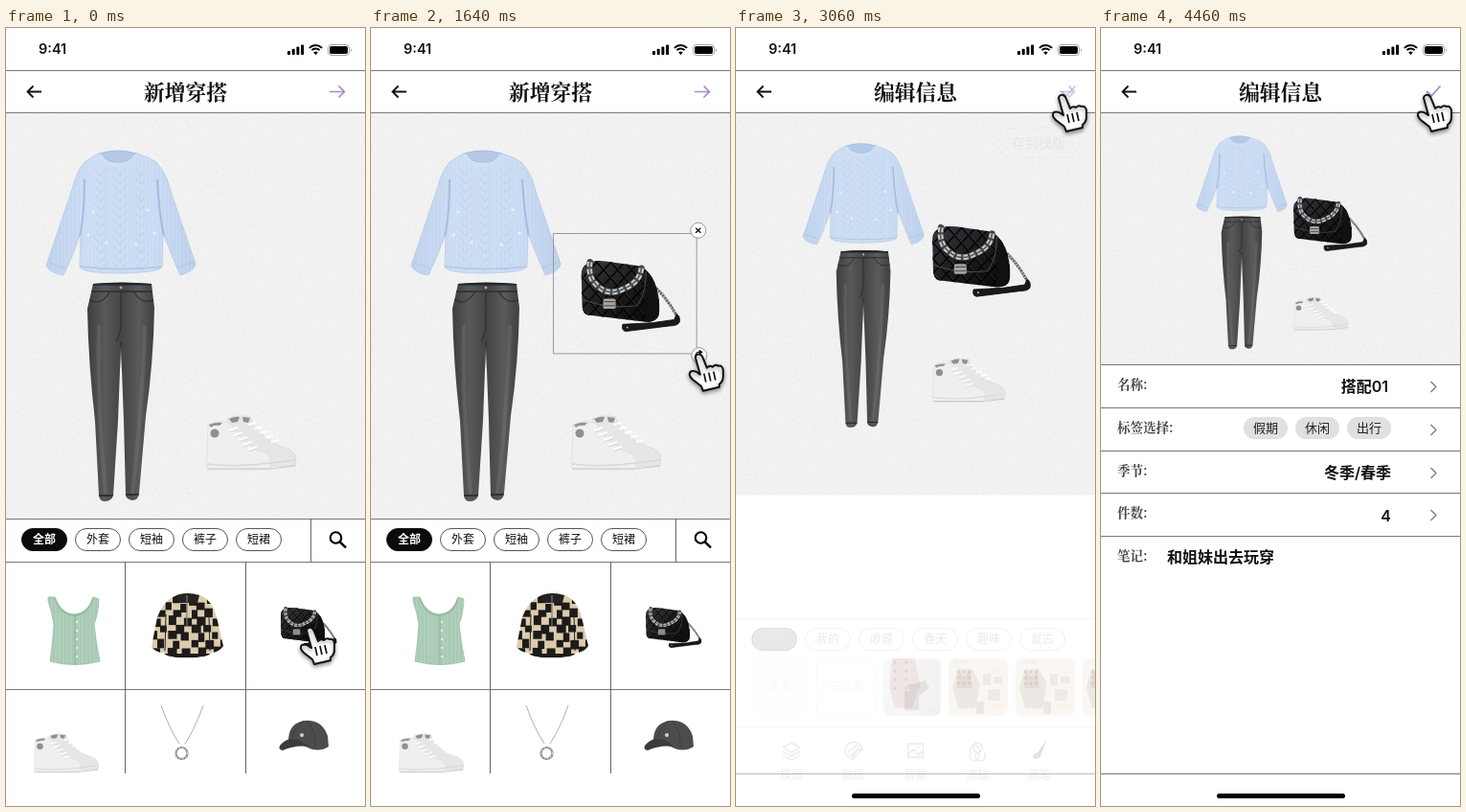
Write an HTML page with a canvas that moves like this. It is 375 by 812 pixels and loops after 4.98 s.

```html
<!DOCTYPE html>
<html lang="zh-CN">
<head>
<meta charset="utf-8">
<style>
html, body { margin: 0; width: 100%; height: 100%; overflow: hidden; background: #fff; }
canvas { display: block; width: 375px; height: 812px; }
</style>
</head>
<body>
<canvas id="stage"></canvas>
<script>
const LOOP = 4980, W = 375, H = 812;
const SANS = '"Inter", "Noto Sans CJK SC", "Noto Sans CJK", sans-serif';
const SERIF = '"Noto Serif CJK SC", "Noto Sans CJK SC", "Noto Sans CJK", serif';
const INK = '#111', RULE = '#777', PURPLE = '#a98acb';
const canvas = document.getElementById('stage');
const ratio = window.devicePixelRatio || 1;
canvas.width = W * ratio;
canvas.height = H * ratio;
const c = canvas.getContext('2d');

// ---- helpers ----
const clamp = x => Math.max(0, Math.min(1, x));
const span = (t, a, b) => clamp((t - a) / (b - a));
const ease = x => (1 - Math.cos(Math.PI * x)) / 2;
const mix = (a, b, p) => a + (b - a) * p;
const mixPoint = (a, b, p) => [mix(a[0], b[0], p), mix(a[1], b[1], p)];

function random(seed) {
  return () => (seed = (seed * 16807) % 2147483647) / 2147483647;
}

function group(draw, { alpha = 1, x = 0, y = 0, scale = 1 } = {}) {
  if (alpha <= 0) return;
  c.save();
  c.globalAlpha *= alpha;
  c.translate(x, y);
  c.scale(scale, scale);
  draw();
  c.restore();
}

function shape(d, fill, stroke, width = 1) {
  const path = new Path2D(d);
  if (fill) { c.fillStyle = fill; c.fill(path); }
  if (stroke) { c.strokeStyle = stroke; c.lineWidth = width; c.stroke(path); }
}

function clipped(d, draw) {
  c.save();
  c.clip(new Path2D(d));
  draw();
  c.restore();
}

function box(x, y, w, h, r, fill, stroke, dash = []) {
  c.beginPath();
  c.roundRect(x, y, w, h, r);
  if (fill) { c.fillStyle = fill; c.fill(); }
  if (stroke) {
    c.setLineDash(dash);
    c.strokeStyle = stroke;
    c.lineWidth = 1;
    c.stroke();
    c.setLineDash([]);
  }
}

function dot(x, y, r, fill, stroke, width = 1) {
  c.beginPath();
  c.arc(x, y, r, 0, 7);
  if (fill) { c.fillStyle = fill; c.fill(); }
  if (stroke) { c.strokeStyle = stroke; c.lineWidth = width; c.stroke(); }
}

const rule = (y, color = RULE) => shape(`M0 ${y + .5}H375`, null, color);

function text(s, x, y, size, { weight = 500, color = INK, align = 'center', family = SANS } = {}) {
  c.font = `${weight} ${size}px ${family}`;
  c.fillStyle = color;
  c.textAlign = align;
  c.textBaseline = 'alphabetic';
  c.fillText(s, x, y + size * .37);
}

function paperPattern() {
  const tile = document.createElement('canvas');
  tile.width = tile.height = 128;
  const p = tile.getContext('2d'), next = random(41);
  for (let i = 0; i < 128 * 128; i++) {
    const v = 238 + Math.floor(next() * 7);
    p.fillStyle = `rgb(${v},${v},${v})`;
    p.fillRect(i % 128, i >> 7, 1, 1);
  }
  return c.createPattern(tile, 'repeat');
}
const paper = paperPattern();

// ---- clothes ----
function sweater() {
  const outline = 'M97 131Q117 126 137 131Q150 135 157 140Q168 152 172 170L198 246Q197 254 182 258Q174 240 164 214L163 249Q161 255 120 256Q79 256 77 249L78 214Q70 238 60 258Q46 256 42 248L69 168Q74 149 82 140Q89 135 97 131Z';
  const tone = c.createLinearGradient(42, 0, 198, 0);
  tone.addColorStop(0, '#bdd1ec');
  tone.addColorStop(.3, '#cbdcf3');
  tone.addColorStop(.7, '#c9dbf3');
  tone.addColorStop(1, '#bacfeb');
  shape(outline, tone, '#b4c9e6', .8);
  clipped(outline, () => {
    for (let x = 50; x < 198; x += 4) shape(`M${x} 128V258`, null, 'rgba(255,255,255,.15)', 1.2);
    for (let y = 146; y < 250; y += 9) {
      for (const x of [99, 119, 141]) shape(`M${x - 7} ${y}l7 8l7 -8`, null, 'rgba(151,178,217,.3)');
    }
    shape('M82 158Q82 195 77 218M158 158Q160 195 165 218', null, 'rgba(126,158,205,.5)', 2);
    shape('M77 249Q119 254 164 249M43 244l19 7M178 250l20 -6', null, '#b2c8e5', 1.3);
    for (const [x, y] of [[91, 192], [148, 190], [86, 216], [155, 214], [105, 224], [136, 226]]) dot(x, y, 1.6, '#e9f1fc');
  });
  shape('M98 131Q117 125 136 131Q131 140 117 140Q103 140 98 131Z', '#b3c9e7', '#a5bedf', 1);
  shape('M98 132Q104 143 117 143Q130 143 136 132', null, '#d0e0f5', 3);
}

function jeans() {
  const outline = 'M91 267Q120 264 152 267L155 292Q154 350 146 405L139 486Q138 493 132 493Q126 492 125 488L123 410L120 331L117 410L112 488Q110 494 103 494Q98 494 97 488L93 410Q86 350 85 293Z';
  const tone = c.createLinearGradient(85, 0, 157, 0);
  ['#3d3e40', '#58595b', '#434446', '#5a5b5d', '#3a3b3d'].forEach((v, i) => tone.addColorStop(i / 4, v));
  shape(outline, tone);
  clipped(outline, () => {
    shape('M90 267H153', null, '#242527', 3);
    shape('M87 275H156', null, '#2c2d2f', 1.3);
    shape('M86 283Q99 291 108 276M134 276Q142 290 156 283M120 276V310Q119 322 115 327M120 327V410', null, '#2c2d2f', 1.2);
    shape('M97 310Q95 390 104 486M145 310Q143 390 132 486', null, 'rgba(135,136,138,.25)', 4);
    shape('M95 488H114M123 487H142', null, '#252628', 1.3);
  });
  dot(120, 271, 1.4, '#b0a8a0');
}

function sneakers() {
  shape('M231 408Q243 403 256 406L258 414Q272 431 288 437Q303 440 303 451L302 457L235 458Z', '#e6e6e5', '#d8d8d7', .8);
  shape('M233 408Q240 405 244 406L242 411L236 412ZM247 406L255 407L253 412L248 411Z', '#8d8f90');
  shape('M211 414Q223 408 235 413L240 420Q249 434 264 441Q279 444 277 457L275 461H211Q208 459 210 445Z', '#efefee', '#dededd', .8);
  shape('M212 414Q219 411 226 412L223 415Q217 414 214 417Z', '#929394');
  shape('M210 455Q240 459 276 454L302 451', null, '#d8d8d7', 1.4);
  shape('M210 460H276L302 457', null, '#c8c8c7', 1.2);
  for (let i = 0; i < 5; i++) {
    shape(`M${233 + i * 5} ${420 + i * 5}l9 -3M${253 + i * 6} ${414 + i * 4.5}l8 -2`, null, '#fff', 2);
    shape(`M${233 + i * 5} ${422 + i * 5}l9 -3`, null, '#d4d4d4', .8);
  }
  dot(218, 423, 4.5, '#8d8f90');
}

function chain(d, width) {
  c.lineCap = 'round';
  shape(d, null, '#45464a', width);
  c.lineCap = 'butt';
  c.setLineDash([width * .75, width * .4]);
  shape(d, null, '#c9cacc', width * .85);
  shape(d, null, '#55565a', width * .25);
  c.setLineDash([]);
}

function bag(x, y, scale) {
  group(() => {
    c.translate(-272, -280);
    chain('M301 266Q316 278 331 304', 3.4);
    shape('M331 303Q336 305 335 313Q333 318 322 318L266 325Q260 324 262 316L300 314L328 310Z', '#1a1a1c', '#070707', 1);
    dot(268, 320, 1.3, '#aaa');
    const body = 'M214 240Q222 233 240 235L282 241Q295 245 303 262Q310 280 309 300Q308 313 292 313L217 304Q211 303 210 292L209 252Q209 243 214 240Z';
    const tone = c.createLinearGradient(225, 235, 285, 315);
    tone.addColorStop(0, '#333338');
    tone.addColorStop(.5, '#1c1c1f');
    tone.addColorStop(1, '#0b0b0c');
    shape(body, tone);
    clipped(body, () => {
      for (let i = -80; i < 110; i += 18) {
        shape(`M${215 + i} 232l75 85`, null, '#050506', 2);
        shape(`M${217 + i} 232l75 85`, null, '#3e3e43', .8);
        shape(`M${295 + i} 232l-75 80`, null, '#050506', 2);
      }
      shape('M210 284Q245 297 280 292Q292 278 292 247', null, '#48484c', 1.3);
      shape('M293 250Q310 278 308 312L290 313Q297 285 293 250Z', '#111113');
    });
    chain('M220 236Q217 256 229 266Q244 281 264 270Q284 262 286 244', 8);
    box(237, 283, 16, 13, 2, '#aaa49d');
    shape('M238 287H252M238 292H252', null, '#58534f', 1.5);
  }, { x, y, scale });
}

function vest() {
  const outline = 'M44 594L51 594Q57 611 71 612Q86 611 91 594L97 596Q96 613 92 622Q94 642 98 661Q72 668 46 661Q49 640 50 622Q48 610 44 598Z';
  shape(outline, '#a8cab5', '#98bba6', .8);
  clipped(outline, () => {
    for (let x = 44; x < 102; x += 4) shape(`M${x} 594V668`, null, 'rgba(219,238,224,.25)', 1.2);
    shape('M72 612V667', null, '#8db39c', 1.2);
  });
  shape('M51 595Q57 613 72 613Q86 612 91 595', null, '#93b8a2', 1.4);
  for (let y = 620; y < 664; y += 9) dot(74, y, 1.2, '#e6efe6');
}

function jacket() {
  const outline = 'M178 592Q189 588 203 592Q216 598 220 615L227 645Q222 652 214 652Q212 657 189 657Q166 657 165 652Q157 652 152 646L158 615Q164 598 178 592Z';
  shape(outline, '#dccbad');
  clipped(outline, () => {
    const next = random(77);
    c.fillStyle = '#1d1b19';
    for (let row = 0; row < 9; row++) {
      for (let col = 0; col < 10; col++) {
        if ((row + col) % 2) c.fillRect(150 + col * 8 + next() * 4, 589 + row * 8 + next() * 4, 6 + next() * 4, 7 + next() * 3);
      }
    }
    c.fillRect(164, 653, 52, 6);
    shape('M167 612L166 650M212 612L213 650', null, '#222', 1);
  });
  shape('M178 592Q189 588 202 592L200 600H180Z', '#242321');
  shape('M189 592V625', null, '#6c7c88', 1.2);
}

function necklace() {
  shape('M162 707Q170 730 181 747M206 707Q198 730 187 747', null, '#a6a6a6', .9);
  dot(183.5, 757, 6, null, '#8d8d8d', 2.2);
  c.setLineDash([1.5, 2]);
  dot(183.5, 757, 6, null, '#e4e4e4', 1);
  c.setLineDash([]);
}

function cap() {
  shape('M295 744Q295 726 311 723Q330 721 336 739L337 750Q326 757 313 750Q304 745 295 746Z', '#4b4c4d');
  shape('M296 742Q308 741 316 750Q302 748 289 754Q284 753 286 749Q290 744 296 742Z', '#3a3b3c');
  shape('M314 723Q324 732 323 751M311 723Q301 730 299 741', null, '#3e3f40', 1);
  dot(309, 738, 2, '#d4d4d4');
}

// ---- interface ----
function pill(label, x, y, active) {
  box(x + .5, y + .5, 47, 23, 11.5, active ? '#0b0b0b' : '#fff', active ? '#0b0b0b' : '#555');
  text(label, x + 24, y + 12, 12, { weight: active ? 700 : 500, color: active ? '#fff' : INK });
}

const pills = (labels, y) => labels.forEach((s, i) => pill(s, 16 + i * 56, y, i === 0));

function statusBar() {
  text('9:41', 34, 22, 14.5, { weight: 600, align: 'left' });
  for (let i = 0; i < 4; i++) box(294 + i * 4.7, 24 - i * 2.2, 3, 4 + i * 2.2, .8, '#000');
  for (const r of [9, 5.6]) {
    c.beginPath();
    c.arc(323.5, 27, r, -Math.PI * .76, -Math.PI * .24);
    c.strokeStyle = '#000';
    c.lineWidth = 2;
    c.stroke();
  }
  shape('M323.5 28l-2.3 -2.6q2.3 -1.8 4.6 0Z', '#000');
  box(336.5, 17.5, 22, 11, 3.5, null, '#a5a5a5');
  box(338, 19, 19, 8, 2, '#000');
  shape('M360 21.5q2 1.5 0 3.5Z', '#999');
}

function header(editing, checked) {
  c.fillStyle = '#fff';
  c.fillRect(0, 0, W, 88);
  statusBar();
  rule(44);
  rule(88);
  shape('M37 66.5H22.5M28.5 60.5L22.5 66.5L28.5 72.5', null, INK, 1.8);
  const style = { weight: 900, family: SERIF };
  group(() => text('新增穿搭', 187.5, 66.5, 21.8, style), { alpha: 1 - editing });
  group(() => text('编辑信息', 187.5, 66.5, 21.8, style), { alpha: editing });
  group(() => shape('M338 66.5H353.5M347.5 60.5L353.5 66.5L347.5 72.5', null, PURPLE, 1.7), { alpha: 1 - checked });
  group(() => shape('M340 66L345 71L354.5 60.5', null, PURPLE, 1.8), { alpha: checked });
}

function wardrobe() {
  c.fillStyle = '#fff';
  c.fillRect(0, 512, W, 300);
  rule(512);
  rule(557);
  rule(690);
  shape('M318.5 512V557M124.5 557V778M250.5 557V778', null, '#666');
  pills(['全部', '外套', '短袖', '裤子', '短裙'], 522);
  dot(344.5, 532, 5.8, null, '#000', 2.1);
  shape('M348.8 536.3L355 542.3', null, '#000', 2.5);
  vest();
  jacket();
  bag(316, 626, .46);
  clipped('M0 690H375V778H0Z', () => group(() => {
    c.translate(-209, -404);
    sneakers();
  }, { x: 29, y: 736, scale: .72 }));
  necklace();
  cap();
}

function boots(x) {
  box(x, 658, 60, 60, 7, '#a7a39d');
  c.save();
  c.clip();
  shape(`M${x + 36} 658h24v60h-24Z`, '#c5c0b8');
  shape(`M${x + 9} 658h24l5 28l-8 24h-18l-6 -22Z`, '#873f2e');
  for (let i = 0; i < 15; i++) dot(x + 12 + i % 4 * 6, 662 + Math.floor(i / 4) * 9, 1.7, i % 2 ? '#e0c5a6' : '#252222');
  shape(`M${x + 25} 686l19 -5l4 8l-16 12ZM${x + 22} 692h15v20h-15Z`, '#252729');
  dot(x + 7, 712, 5, '#ded8c8');
  dot(x + 53, 712, 5, '#d4c7a8');
  c.restore();
}

function collage(x) {
  box(x, 658, 62, 60, 7, '#c59c70');
  c.save();
  c.clip();
  text('今日穿搭', x + 5, 663, 4, { align: 'left', color: '#50402f' });
  shape(`M${x + 10} 669h14l9 15l-5 26h-18l-6 -22Z`, '#4e4b4a');
  shape(`M${x + 11} 669l5 12l6 -12l3 20h-16Z`, '#9f4d2b');
  for (let i = 0; i < 9; i++) dot(x + 10 + i % 3 * 6, 672 + Math.floor(i / 3) * 6, 1.5, '#242120');
  shape(`M${x + 36} 674h8v12h-8ZM${x + 47} 677h9v7h-9ZM${x + 41} 690h13v12h-13Z`, '#686b69');
  dot(x + 50, 671, 5, '#ddd5c7');
  box(x + 29, 703, 8, 13, 1, '#4b382d');
  box(x + 43, 705, 15, 6, 2, '#ddcbb0');
  c.restore();
}

const TABS = [
  ['模版', 'M0 -8L9 -3L0 2L-9 -3ZM-9 1L0 6L9 1M-9 5L0 10L9 5'],
  ['贴纸', 'M9 -1A9 9 0 1 0 -1 9L9 -1Q1 -2 -1 9M-6 2L4 -6M-3 6L6 -3'],
  ['背景', 'M-8 -7H8V7H-8ZM-8 4L-2 -1L3 5L5 2L8 4M3 -3h1'],
  ['滤镜', 'M-5 -3A5 5 0 1 1 5 -3A5 5 0 1 1 -5 -3M-7 3A5 5 0 1 0 1 3A5 5 0 1 0 -7 3M-1 3A5 5 0 1 0 7 3'],
  ['画笔', 'M6 -8L-1 2L1 4ZM-2 3Q-6 4 -6 8Q0 8 1 5Z']
];

function templates() {
  c.fillStyle = '#fff';
  c.fillRect(0, 616, W, 196);
  rule(616);
  rule(729);
  pills(['精选', '我的', '收藏', '春天', '趣味', '复古'], 626);
  box(16, 658, 60, 60, 7, '#eee');
  text('更多', 46, 688, 12, { color: '#aaa' });
  box(84.5, 658.5, 61, 60, 7, null, '#aaa', [4, 3]);
  text('无应用', 115, 688, 12, { color: '#aaa' });
  boots(154);
  [222, 292, 362].forEach(collage);
  TABS.forEach(([label, icon], i) => {
    const x = 58 + i * 64.75;
    group(() => shape(icon, i === 4 ? INK : null, INK, 1.3), { x, y: 754 });
    text(label, x, 780, 12, { color: '#222' });
  });
}

function saveButton() {
  box(273.5, 104.5, 85, 31, 15.5, 'rgba(255,255,255,.2)', '#888', [4, 3]);
  text('存到模版', 316, 120, 14, { weight: 400, color: '#777' });
}

const value = (s, x, y) => text(s, x, y, 16, { weight: 600, align: 'right' });

const ROWS = [
  { y: 351, start: 3300, label: '名称:', draw: y => value('搭配01', 300, y + 23) },
  { y: 396, start: 3370, label: '标签选择:', draw: y => ['假期', '休闲', '出行'].forEach((s, i) => {
    box(149 + i * 54, y + 10, 46, 23, 11.5, '#e0e0e0');
    text(s, 172 + i * 54, y + 21.5, 13, { color: '#222' });
  }) },
  { y: 441, start: 3620, label: '季节:', draw: y => value('冬季/春季', 303, y + 23) },
  { y: 485, start: 3850, label: '件数:', draw: y => value('4', 303, y + 24) },
  { y: 530, start: 4050, label: '笔记:', plain: true, draw: y => text('和姐妹出去玩穿', 69, y + 22, 16, { weight: 600, align: 'left' }) }
];

function details(t) {
  for (const row of ROWS) {
    const p = span(t, row.start, row.start + 410);
    group(() => {
      rule(row.y);
      text(row.label, 17, row.y + 21.5, 13.5, { align: 'left', weight: 600, color: '#444', family: SERIF });
      row.draw(row.y);
      if (!row.plain) shape(`M344.5 ${row.y + 18}l5.5 5.5l-5.5 5.5`, null, '#777', 1.2);
    }, { alpha: p, y: Math.round(10 * (1 - p)) });
  }
}

function selection(scale, alpha) {
  group(() => {
    const at = (x, y) => [271 + x * scale, 280 + y * scale];
    const [x, y] = at(-80, -65);
    box(Math.round(x) + .5, Math.round(y) + .5, 148 * scale, 124 * scale, 0, null, '#999');
    const [cx, cy] = at(70, -68), [rx, ry] = at(71, 61);
    dot(cx, cy, 8, '#fff', '#999');
    shape(`M${cx - 2.6} ${cy - 2.6}l5.2 5.2m0 -5.2l-5.2 5.2`, null, '#000', 1.3);
    dot(rx, ry, 8, '#fff', '#999');
    c.beginPath();
    c.arc(rx, ry, 3.6, .2, 5);
    c.strokeStyle = '#000';
    c.lineWidth = 1.2;
    c.stroke();
    shape(`M${rx} ${ry - 6}l4 2.5l-4 2.5Z`, '#000');
  }, { alpha });
}

function hand([x, y], alpha) {
  group(() => {
    c.lineJoin = 'round';
    c.shadowColor = 'rgba(0,0,0,.4)';
    c.shadowBlur = 4 * ratio;
    c.shadowOffsetY = 2 * ratio;
    shape('M-4 2Q-3 -2 1 -1Q3 0 4 3L8 13Q11 10 14 12Q17 9 20 11Q24 10 25 15L25 22Q25 27 21 30L21 33L4 37L2 32L-7 25Q-12 20 -9 17Q-5 15 1 20Z', '#fff', '#111', 2);
    c.shadowColor = 'transparent';
    shape('M5 19l2 9M10 18l2 9M15 17l2 9', null, '#111', 1.7);
  }, { x, y, alpha });
}

// ---- timeline ----
const HAND = { tile: [318, 627], drop: [270, 271], rest: [254, 280], corner: [342, 341], stretched: [360, 356], away: [243, 225], done: [341, 71] };

function handPose(t, drag, grow) {
  if (t < 640) return [mixPoint(HAND.tile, HAND.drop, drag), 1];
  if (t < 1160) return [mixPoint(HAND.drop, HAND.rest, ease(span(t, 640, 900))), 1];
  if (t < 1600) return [mixPoint(HAND.rest, HAND.corner, ease(span(t, 1160, 1540))), 1];
  if (t < 1940) return [mixPoint(HAND.corner, HAND.stretched, grow), 1];
  if (t < 2500) return [mixPoint(HAND.stretched, HAND.away, ease(span(t, 1940, 2180))), 1 - span(t, 2120, 2260)];
  return [HAND.done, span(t, 2760, 2850)];
}

function render(t) {
  const drag = ease(span(t, 60, 640));
  const grow = ease(span(t, 1600, 1900));
  const editing = ease(span(t, 2240, 2560));
  const shrink = ease(span(t, 2860, 3270));
  const boardBottom = mix(mix(512, 616, editing), 351, shrink);

  c.setTransform(ratio, 0, 0, ratio, 0, 0);
  c.fillStyle = '#fff';
  c.fillRect(0, 0, W, H);
  c.fillStyle = paper;
  c.fillRect(0, 88, W, boardBottom - 88);

  group(() => {
    sweater();
    jeans();
    sneakers();
    if (t >= 2220) bag(272, 280, 1);
  }, { x: 74 * shrink, y: 35 * shrink, scale: mix(1, .608, shrink) });

  group(wardrobe, { alpha: 1 - span(t, 2240, 2500) });
  const tray = span(t, 2400, 2720) * (1 - span(t, 2860, 3080));
  group(templates, { alpha: tray });
  group(saveButton, { alpha: tray });
  group(() => rule(778), { alpha: shrink });
  group(() => box(121, 799, 134, 5, 2.5, '#000'), { alpha: editing });
  details(t);
  header(editing, shrink);

  if (t < 2220) {
    const [x, y] = mixPoint([316, 626], [271, 280], drag);
    bag(x + grow, y, mix(mix(.46, .805, drag), 1, grow));
    selection(mix(1, 1.25, grow), span(t, 640, 760) * (1 - span(t, 1900, 2000)));
  }
  hand(...handPose(t, drag, grow));
}

function tick() {
  render(performance.now() % LOOP);
  requestAnimationFrame(tick);
}
tick();
</script>
</body>
</html>
```
